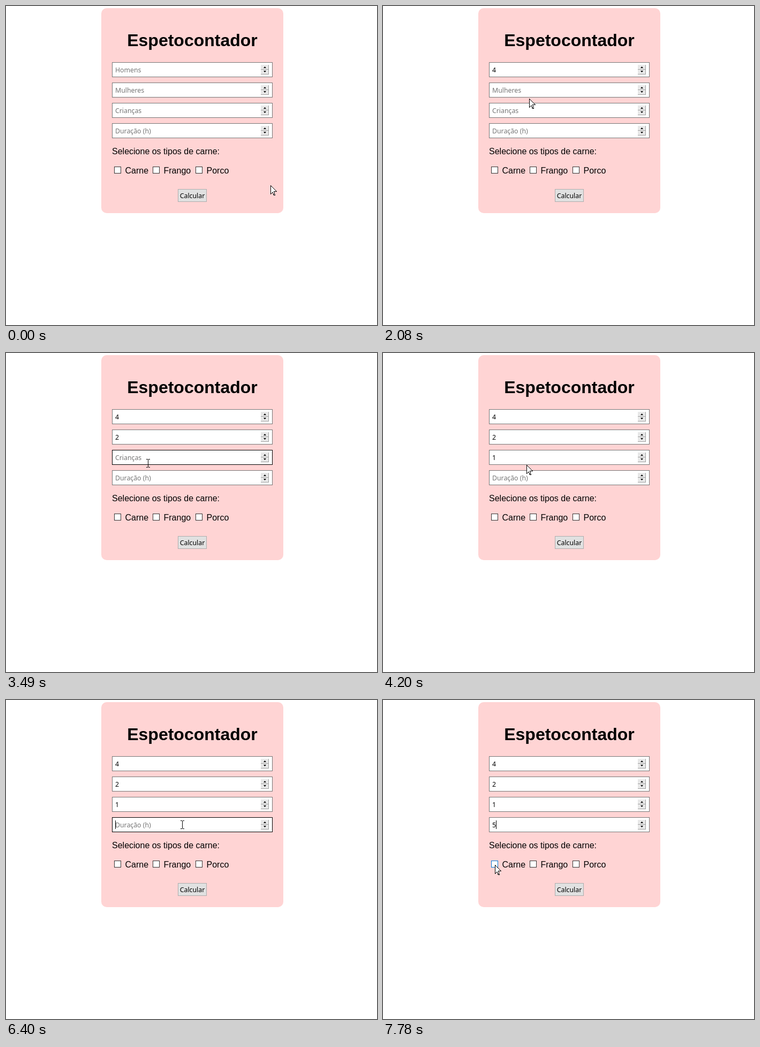
An HTML page that plays this animation: 693x596 px, repeating every 8000 ms.

```html
<!DOCTYPE html>
<html lang="pt">
<head>
<meta charset="utf-8">
<style>
  html, body { margin: 0; width: 100%; height: 100%; overflow: hidden; background: #fff; }
  svg { display: block; width: 693px; height: 596px; }
  text { font: 16px "Liberation Sans", Arial, sans-serif; white-space: pre; }
  .title { font-size: 32px; font-weight: bold; }
  .ui { font: 12.3px "Noto Sans", sans-serif; }
  .mid { text-anchor: middle; }
</style>
</head>
<body>
<svg id="stage" viewBox="0 0 693 596"></svg>
<script>
const LOOP = 8000, STEP = 75, BLINK = 550;
const stage = document.getElementById('stage');

const fields = [
  { label: 'Homens', value: '4', focus: 740, typed: 1770 },
  { label: 'Mulheres', value: '2', focus: 2700, typed: 3090 },
  { label: 'Crianças', value: '1', focus: 3740, typed: 4060 },
  { label: 'Duração (h)', value: '5', focus: 5290, typed: 6630 }
];

// straight pointer moves, each from where the last one stopped
const home = { x: 494, y: 335, start: 0, end: 0 };
const moves = [
  { start: 70, end: 420, x: 312, y: 112 },
  { start: 1850, end: 2080, x: 273, y: 173 },
  { start: 2160, end: 2550, x: 272, y: 165 },
  { start: 3170, end: 3490, x: 265, y: 206 },
  { start: 4140, end: 4680, x: 287, y: 233 },
  { start: 5210, end: 5440, x: 291, y: 238 },
  { start: 5700, end: 5850, x: 329, y: 233 },
  { start: 6940, end: 7550, x: 209, y: 308 }
];

function add(tag, attrs, content) {
  const node = document.createElementNS('http://www.w3.org/2000/svg', tag);
  for (const key in attrs) node.setAttribute(key, attrs[key]);
  if (content) node.textContent = content;
  return stage.appendChild(node);
}

function box(x, y, width, height, fill, stroke) {
  return add('rect', { x: x + .5, y: y + .5, width: width - 1, height: height - 1, fill, stroke });
}

function label(x, y, content, cls = '') {
  return add('text', { x, y, class: cls }, content);
}

function spinner(y) {
  for (const top of [y + 5, y + 14]) {
    add('rect', { x: 476, y: top, width: 15, height: 9, fill: '#a0a0a0' });
    add('rect', { x: 476, y: top, width: 14, height: 8, fill: '#e8e8e8' });
  }
  add('path', { d: `M481 ${y + 11}h5l-2.5-3zM481 ${y + 16}h5l-2.5 3z` });
}

add('rect', { x: 178, y: 4, width: 340, height: 383, rx: 10, fill: '#ffd4d4' });
label(348, 75, 'Espetocontador', 'title mid');
fields.forEach((f, i) => {
  f.y = 105 + 38 * i;
  f.frame = box(198, f.y, 300, 28, '#fff', '#767676');
  spinner(f.y);
  f.text = label(204, f.y + 19, f.label, 'ui');
});
label(198, 277, 'Selecione os tipos de carne:');
const checks = [['Carne', 202], ['Frango', 274], ['Porco', 354]].map(([name, x]) => {
  label(x + 20.5, 313, name);
  return box(x, 300, 13, 13, '#fff', '#333');
});
box(321, 342, 54, 24, '#e1e1e1', '#adadad');
label(348, 359, 'Calcular', 'ui mid');

const caret = add('rect', { width: 1, height: 16 });
const arrow = add('path', {
  d: 'M.5 .5V16.5L4 13L6.5 18.5H8.5L6.5 11.5H11.5Z',
  fill: '#fff', stroke: '#000', 'shape-rendering': 'crispEdges'
});
const beam = add('path', {
  d: 'M-3 -7.5h3M1 -7.5h3M.5 -7V7M-3 7.5h3M1 7.5h3', fill: 'none', stroke: '#000'
});

// the pointer advances in equal hops, the first one right at the start
function pointer(t) {
  const i = moves.findLastIndex(m => t >= m.start);
  if (i < 0) return { ...home, moving: false };
  const to = moves[i], from = moves[i - 1] || home;
  const length = to.end - to.start;
  const gaps = Math.round(length / STEP);
  const hops = Math.floor((t - to.start) * gaps / length + 1e-6) + 1;
  const p = Math.min(1, hops / (gaps + 1));
  return {
    x: Math.round(from.x + (to.x - from.x) * p),
    y: Math.round(from.y + (to.y - from.y) * p),
    moving: t < to.end + STEP
  };
}

function show(node, visible) {
  node.setAttribute('visibility', visible ? 'visible' : 'hidden');
}

// blinks from the last click or key, hidden while the pointer moves
function drawCaret(t, moving) {
  const f = fields.findLast(f => t >= f.focus);
  const filled = f && t >= f.typed;
  const since = f && (filled ? f.typed : f.focus);
  const visible = f && !moving && Math.floor((t - since) / BLINK) % 2 === 0;
  show(caret, visible);
  if (!visible) return;
  caret.setAttribute('x', filled ? 211 : 204);
  caret.setAttribute('y', f.y + 6);
}

function render(t) {
  const { x, y, moving } = pointer(t);
  const over = (left, top, width, height) =>
    x >= left && x < left + width && y >= top && y < top + height;

  for (const f of fields) {
    const filled = t >= f.typed;
    f.frame.setAttribute('stroke', over(198, f.y, 300, 28) ? '#000' : '#767676');
    f.text.textContent = filled ? f.value : f.label;
    f.text.setAttribute('fill', filled ? '#000' : '#757575');
  }
  checks[0].setAttribute('stroke', over(202, 300, 13, 13) ? '#0078d7' : '#333');
  drawCaret(t, moving);

  const inField = fields.some(f => over(198, f.y, 300, 28));
  show(beam, inField);
  show(arrow, !inField);
  for (const node of [arrow, beam]) node.setAttribute('transform', `translate(${x} ${y})`);
}

const origin = performance.now();
function tick() {
  render((performance.now() - origin) % LOOP);
  requestAnimationFrame(tick);
}
tick();
</script>
</body>
</html>
```
